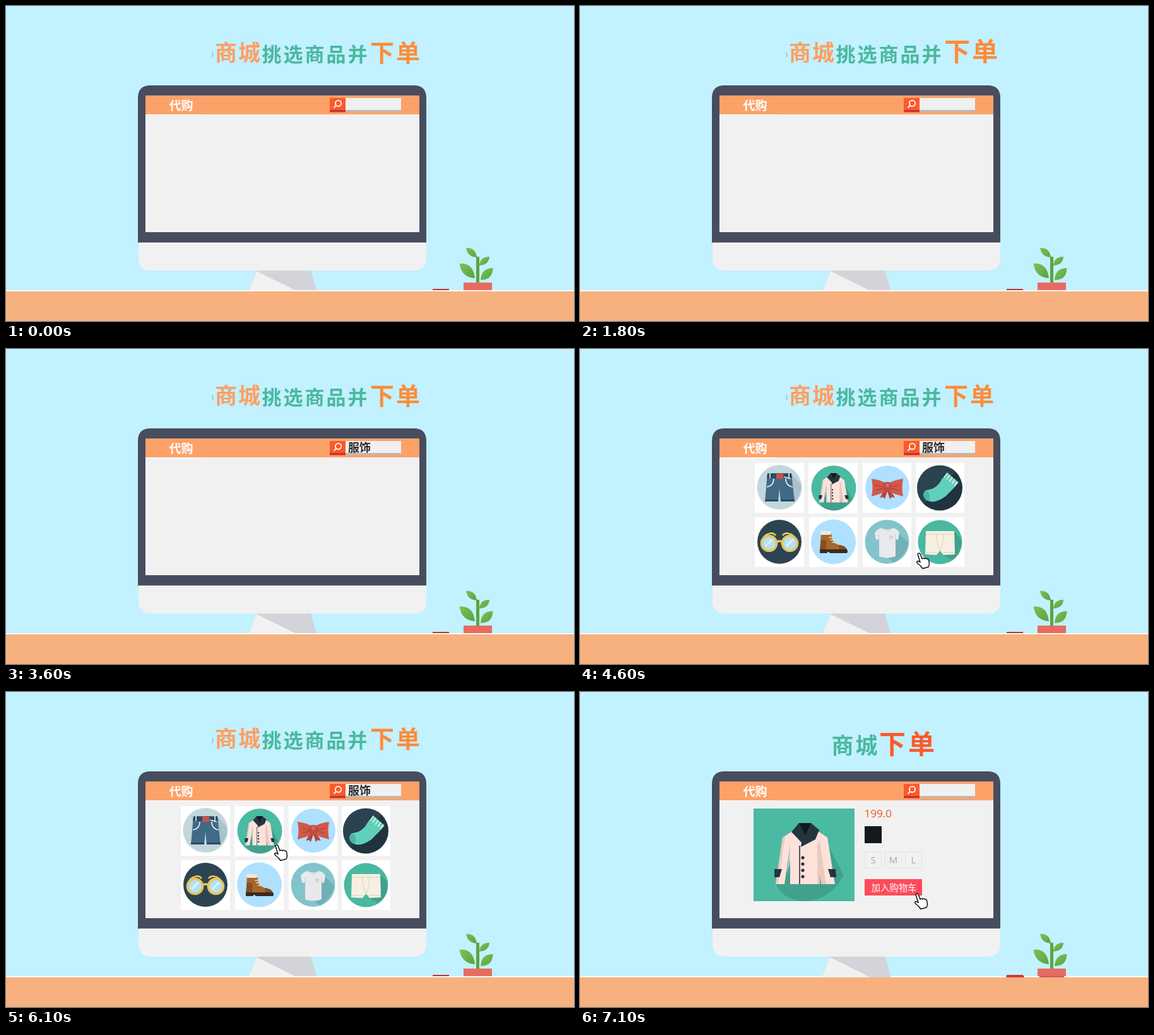
These frames come from a looping animation (900x500 px, 8 s). An HTML page:

```html
<!DOCTYPE html>
<html lang="zh-CN">
<head>
<meta charset="utf-8">
<title>商城下单</title>
<style>
html, body { margin: 0; width: 100%; height: 100%; overflow: hidden; background: #c2f1ff; }
svg { display: block; width: 900px; height: 500px; }
text { font-family: "Noto Sans CJK SC", "Noto Sans CJK", sans-serif; font-weight: 900; }
.thin { font-weight: 400; }
.latin { font-family: "Open Sans", "Noto Sans", sans-serif; font-weight: 400; }

.timed { animation: 8s step-end infinite; }
.shop { animation-name: shop; }
.order { animation-name: order; }
.pulse { animation-name: pulse; transform-origin: 578px 91px; }
.key1 { animation-name: key1; }
.key2 { animation-name: key2; }
.cards { animation-name: cards; }
.icons { animation-name: icons; }
.hand { animation-name: hand; }

@keyframes shop { 0% { opacity: 1 } 88.75%, 100% { opacity: 0 } }
@keyframes order { 0% { opacity: 0 } 88.75%, 100% { opacity: 1 } }
@keyframes pulse {
  0%, 7.5%, 10%, 23.75%, 26.25%, 100% { transform: none }
  6.25%, 8.75%, 22.5%, 25% { transform: scale(1.08) }
}
@keyframes key1 { 0% { opacity: 0 } 38.75% { opacity: 1 } 88.75%, 100% { opacity: 0 } }
@keyframes key2 { 0% { opacity: 0 } 45% { opacity: 1 } 88.75%, 100% { opacity: 0 } }
@keyframes cards { 0% { opacity: 0 } 57.5% { opacity: 1 } 88.75%, 100% { opacity: 0 } }
@keyframes icons { 0% { opacity: 0 } 57.5% { opacity: 1 } 82.5%, 100% { opacity: 0 } }
@keyframes hand {
  0% { opacity: 0; transform: translate(532px, 322px) }
  57.5% { opacity: 1; transform: translate(532px, 322px) }
  63.75% { opacity: 1; transform: translate(505px, 301.75px) }
  65% { opacity: 1; transform: translate(478px, 281.5px) }
  66.25% { opacity: 1; transform: translate(451px, 261.25px) }
  67.5% { opacity: 1; transform: translate(424px, 241px) }
  73.75% { opacity: 1; transform: translate(426px, 243px) }
  76.25% { opacity: 1; transform: translate(424px, 241px) }
  88.75%, 100% { opacity: 1; transform: translate(529px, 318px) }
}
</style>
</head>
<body>
<svg viewBox="0 0 900 500" xmlns="http://www.w3.org/2000/svg">
  <defs>
    <linearGradient id="leaf" x1="0" x2="1" y1="0" y2="1">
      <stop offset="0" stop-color="#7cc15a"/><stop offset="1" stop-color="#57a53c"/>
    </linearGradient>
    <g id="coat">
      <path fill="#41a18d" d="M378 216L418 291Q395 332 356 332Q322 330 311 306Z"/>
      <path fill="#fee2da" d="M338 220L321 231L310 305H324L333 242V305H380V240L389 305H404L392 231L376 220Z"/>
      <path fill="#ecc9c0" d="M376 243L380 235L389 305H382L380 290V305H376ZM321 231L325 229L314 305H310ZM333 242V266L328 290Z"/>
      <path fill="#243540" d="M347 208H366L379 219L373 234L350 246L351 239L335 222ZM308 281H320L316 294H308ZM393 281H405L406 294H397Z"/>
      <path fill="#12191f" d="M347 208H366L357 228Z"/>
      <path stroke="#243540" stroke-width="1.6" d="M348 244V305"/>
      <path stroke="#243540" stroke-width="5.2" stroke-linecap="round" d="M353 263h.01M353 273h.01M353 283h.01M353 293h.01"/>
    </g>
  </defs>

  <rect width="900" height="500" fill="#c2f1ff"/>

  <!-- titles -->
  <g class="timed shop">
    <path d="M327 73Q328.5 77 327 81" fill="none" stroke="#8aa9a0"/>
    <text x="331" y="87" font-size="35" letter-spacing="2" fill="#ff9f63">商城</text>
    <text x="405.5" y="88" font-size="31" letter-spacing="3" fill="#49b89f">挑选商品并</text>
    <text class="timed pulse" x="577" y="87.5" font-size="38" letter-spacing="3" fill="#ff8b3a">下单</text>
  </g>
  <g class="timed order">
    <text x="398.5" y="98" font-size="35" letter-spacing="3" fill="#49b89f">商城</text>
    <text x="474" y="97.5" font-size="42" letter-spacing="4" fill="#fb5a2b">下单</text>
  </g>

  <!-- desk and monitor -->
  <rect y="452" width="900" height="48" fill="#f6b17e"/>
  <rect y="451" width="900" height="1.8" fill="#fff"/>
  <path fill="#d3d4d9" d="M397 420H483L492 451H385Z"/>
  <path fill="#f1f1f1" d="M397 421L458 451H385Z"/>
  <path fill="#474d5e" d="M209 376V146Q209 126 229 126H646Q666 126 666 146V376Z"/>
  <path fill="#f1f1f1" d="M210 376H666V400Q666 420 646 420H230Q210 420 210 400Z"/>
  <rect x="210" y="375.5" width="456" height="1.5" fill="#fff"/>
  <rect x="221" y="142" width="434" height="217" fill="#f1f1f1"/>
  <rect x="221" y="142" width="434" height="30" fill="#fca269"/>
  <path stroke="#fff" fill="none" d="M312 172.5H221.5V359"/>
  <text x="258.5" y="165" font-size="19" fill="#fff">代购</text>
  <rect x="513" y="146" width="25" height="22" fill="#fb5a2b"/>
  <rect x="513" y="165" width="25" height="3.5" fill="#ce3030"/>
  <rect x="538" y="146" width="88" height="20" fill="#f0f0f0"/>
  <rect x="538" y="165" width="88" height="3" fill="#b9b9b9"/>
  <g fill="none" stroke="#fff" stroke-width="1.8">
    <circle cx="526.5" cy="154.5" r="4.6"/><path d="M523 158L519.5 161.5"/>
  </g>
  <g font-size="18" fill="#2b2b2b">
    <text class="timed key1" x="542" y="162.5">服</text>
    <text class="timed key2" x="560" y="162.5">饰</text>
  </g>

  <!-- plant and book -->
  <rect x="676" y="449" width="26" height="2" fill="#b8343a"/>
  <rect x="745" y="398" width="5" height="41" fill="#5ca33f"/>
  <g fill="url(#leaf)">
    <path d="M729 384Q744 383 746 399Q731 398 729 384Z"/>
    <path d="M766 398Q751 398 750 412Q765 411 766 398Z"/>
    <path d="M718.5 409Q740 407 743 432Q722 431 718.5 409Z"/>
    <path d="M771.5 416Q753 416 752 435Q771 435 771.5 416Z"/>
  </g>
  <rect x="725" y="439" width="45" height="12" fill="#e86b63"/>

  <!-- product grid -->
  <path class="timed cards" fill="#fff" d="M277 181h78v79h-78ZM362 181h78v80h-78ZM448 181h77v79h-77ZM532 181h77v79h-77ZM277 267h78v79h-78ZM363 267h77v79h-77ZM448 267h77v79h-77ZM532 267h77v79h-77Z"/>
  <g class="timed icons">
    <!-- shorts -->
    <circle cx="316" cy="219.5" r="35.5" fill="#c1d7dc"/>
    <path fill="#aac2ca" d="M335 198L349 213Q353 229 340 242Z"/>
    <path fill="#416a86" d="M297 197H335L340 242H318L316 222L314 242H293Z"/>
    <path fill="#2d4a60" d="M297 198H335L336 205H296ZM293 239H314V242H293ZM318 239H340V242H318Z"/>
    <path fill="none" stroke="#eef3f5" stroke-width="1.6" d="M296 219Q307 217 307 206M337 219Q326 217 326 206M301 197v8M331 197v8M323 203L334 206"/>
    <rect x="311" y="198" width="11" height="8" fill="#d1503f"/>

    <!-- coat -->
    <circle cx="402" cy="220.5" r="35.5" fill="#4abaa3"/>
    <use href="#coat" transform="translate(230.6 97.2) scale(.48)"/>

    <!-- bow -->
    <circle cx="487" cy="220" r="35" fill="#b0e0ff"/>
    <path fill="#b5463d" d="M482 224L475 236L480 235L483 238L487 226L491 238L494 235L499 236L492 224Z"/>
    <path fill="#d1584a" d="M462 206Q474 207 487 214Q500 207 512 206Q509 220 512 234Q499 231 487 225Q475 231 462 234Q465 220 462 206Z"/>
    <path stroke="#a83f38" fill="none" d="M468 216L481 219M469 224L481 221M506 216L493 219M505 224L493 221"/>
    <rect x="480" y="211" width="14" height="15" rx="6" fill="#c04a40"/>
    <circle cx="487" cy="216" r="3" fill="#da6a5c"/>

    <!-- sock -->
    <circle cx="570" cy="220.5" r="36" fill="#20333f"/>
    <path fill="#2b4250" d="M545 195A36 36 0 0 1 595 195L545 246A36 36 0 0 1 545 195Z"/>
    <path fill="#60d0ba" d="M576 203L594 219L579 234Q561 247 549 240Q540 232 548 224Q565 223 573 207Z"/>
    <path fill="#4ab7a2" d="M549 224Q557 230 553 241Q545 239 544 232Q544 227 549 224Z"/>
    <path fill="#60d0ba" d="M582 196L600 212L594 219L576 204Z"/>
    <path stroke="#f1f3e6" stroke-width="1.6" d="M582 197L577 204M586 200L581 207M590 203.500L585 210.500M594 207L589 214M598 210.500L593 217.500"/>

    <!-- glasses -->
    <circle cx="316" cy="306" r="35" fill="#2c4452"/>
    <g fill="none" stroke="#e9c45a" stroke-width="3.6">
      <path d="M287 306Q292 294 300 293Q306 291 310 296M344 306Q339 294 331 293Q325 291 321 296" stroke-width="2.6"/>
      <path d="M310 307Q316 303 322 307"/>
      <g fill="#b5e0f2"><circle cx="299.500" cy="308.500" r="12"/><circle cx="332.500" cy="308.500" r="12"/></g>
    </g>
    <path stroke="#dcf3fb" stroke-width="3" d="M294 313L305 302M327 313L338 302"/>

    <!-- boot -->
    <circle cx="401.500" cy="306" r="35.500" fill="#b0e0ff"/>
    <path fill="#a4672f" d="M382 292H398L400 303Q404 311 415 312Q423 314 423 321H380Z"/>
    <path fill="#835024" d="M382 302L390 304V320H380ZM410 311Q422 312 423 320H411Z"/>
    <rect x="381" y="289" width="17" height="6" rx="2" fill="#eee9df"/>
    <path stroke="#f3d9a4" stroke-width="1.300" d="M394 299h6M396 303h6M399 307h5"/>
    <path fill="#3a2a22" d="M380 318H423Q425 321 423 324H396L394 322H392V324H380Z"/>

    <!-- t-shirt -->
    <circle cx="486.500" cy="306" r="35" fill="#83c4cc"/>
    <path fill="#72b0b8" d="M505 292L520 308Q517 327 497 339L488 331Z"/>
    <path fill="#e8e9eb" d="M478 284Q487 289 496 284Q504 286 506 292L504 303L500 302V329Q487 334 474 329V302L469 303L467 292Q470 286 478 284Z"/>
    <path fill="none" stroke="#ccd0d3" d="M478 284Q487 293 496 284M474 294V303M500 294V303"/>
    <rect x="490" y="296" width="6" height="6" fill="#d3d6d8"/>

    <!-- boxers -->
    <circle cx="570.500" cy="306.500" r="35" fill="#49b8a0"/>
    <path fill="#3fa28d" d="M593 290L603 300Q608 322 590 335L575 327Z"/>
    <path fill="#f7f0e2" d="M548 289H593L594 326L576 327L570.500 320L565 327L547 326Z"/>
    <path fill="none" stroke="#d9cfbd" d="M548 294H593M565 294Q565 310 570.500 320Q576 310 576 294M547 323H566M575 323H594"/>
  </g>

  <!-- product page -->
  <g class="timed order">
    <path fill="#d3d4d9" d="M396 421H484L493 453H383Z"/>
    <path fill="#f1f1f1" d="M396 421L460 453H383Z"/>
    <path fill="#d9363a" d="M676 449H702L704 453H675Z"/>
    <rect x="728" y="451" width="39" height="2" fill="#cf5d55"/>
    <rect x="275" y="185" width="160" height="147" fill="#4abaa3"/>
    <use href="#coat"/>
    <text class="latin" x="450.500" y="199" font-size="17" fill="#f4511e">199.0</text>
    <rect x="451" y="213" width="27" height="27" fill="#14191c"/>
    <path fill="none" stroke="#e2e2e2" d="M451.500 253.500h26v26h-26ZM483.500 253.500h26v26h-26ZM515.500 253.500h26v26h-26Z"/>
    <g font-size="15" fill="#aaa" text-anchor="middle">
      <text class="latin" x="464.500" y="272">S</text>
      <text class="latin" x="496.500" y="272">M</text>
      <text class="latin" x="528.500" y="272">L</text>
    </g>
    <rect x="451" y="297" width="91" height="26" fill="#ff4a5a"/>
    <text class="thin" x="461.500" y="315.500" font-size="14.400" fill="#fff">加入购物车</text>
  </g>

  <path class="timed hand" fill="#fff" stroke="#111" stroke-width="1.500" stroke-linejoin="round" d="M3 3.500Q4.500 1 7 3L10 11Q12 9 14 11Q16 9 18 11.500Q20 10.500 20.500 13L21.500 19Q21 22 20 24L11 26.500Q8 22 2 17.500Q1 14.500 4 14.500L7 16.500Z"/>
</svg>
</body>
</html>
```
